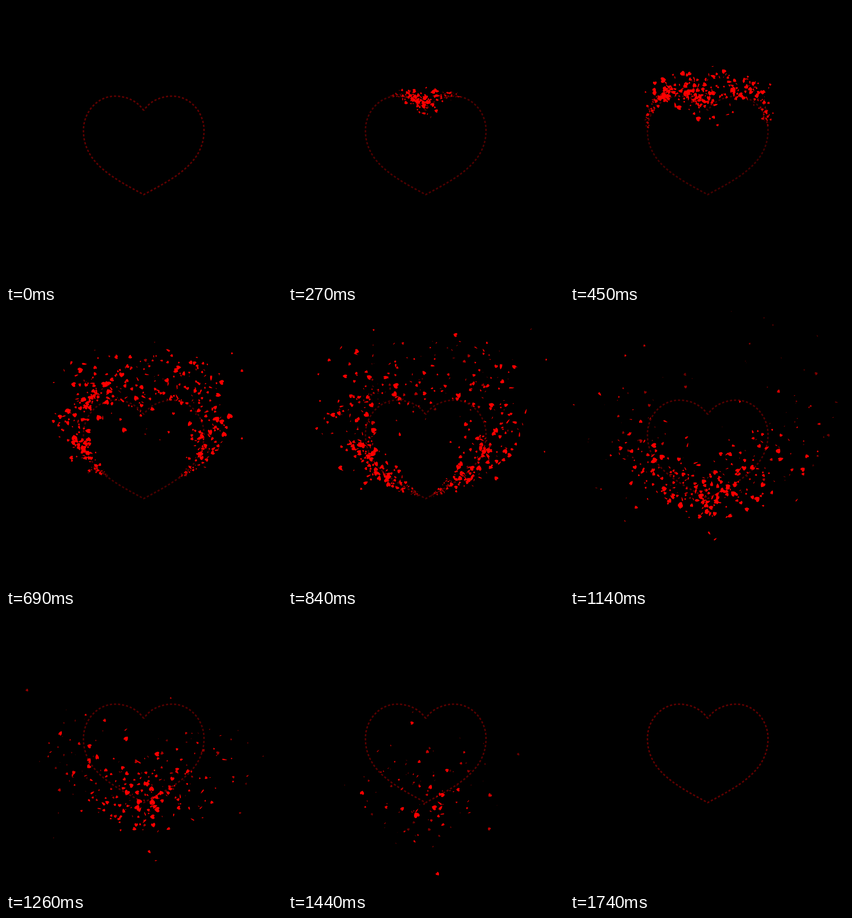
An HTML page with a canvas for the animation above (1.77 s loop, 499 px wide and 499 px high).

```html
<!DOCTYPE html>
<html lang="en">
<head>
<meta charset="utf-8">
<title>Heart burst</title>
<style>
  html, body { margin: 0; width: 100%; height: 100%; overflow: hidden; background: #000; }
  svg, canvas { position: absolute; left: 0; top: 0; width: 499px; height: 499px; }
  path { fill: none; stroke: #600000; stroke-width: 2.7; stroke-dasharray: 4 3.3; }
</style>
</head>
<body>
<svg viewBox="0 0 499 499">
  <path id="outline" d="M249 189C238 172 218 163 197 163C165 163 140 192 140 225C140 285 197 313 249 341C301 313 358 285 358 225C358 192 333 163 301 163C280 163 260 172 249 189"/>
</svg>
<canvas id="stage" width="499" height="499"></canvas>
<script>
const LOOP = 1770, STEP = 30;
const START = 95, END = 870, MAX_LIFE = 870;
const MID = 249;
const outline = document.getElementById('outline');
const ctx = document.getElementById('stage').getContext('2d');
const half = outline.getTotalLength() / 2;

let seed = 20731;
function rand() {
  seed = (seed + 0x6D2B79F5) | 0;
  let n = Math.imul(seed ^ (seed >>> 15), 1 | seed);
  n = (n + Math.imul(n ^ (n >>> 7), 61 | n)) ^ n;
  return ((n ^ (n >>> 14)) >>> 0) / 4294967296;
}
const between = (a, b) => a + (b - a) * rand();
const gauss = () => (rand() + rand() + rand() + rand() - 2) * 1.73;
const clamp = (v, a, b) => Math.max(a, Math.min(b, v));

// Where the left or right emitter stands at a given time
function emitter(time, side) {
  const p = outline.getPointAtLength(half * clamp((time - START) / (END - START), 0, 1));
  return { x: side < 0 ? p.x : 2 * MID - p.x, y: p.y };
}

function petal(born, side, drift, spread, life) {
  const p = emitter(born, side);
  const lift = clamp((300 - p.y) / 100, 0, 1);
  const [dx, dy] = drift || [
    (p.x - MID) / 109 * 0.055 * lift,
    -0.08 * clamp((235 - p.y) / 65, 0, 1)
  ];
  const wild = rand() < 0.1 ? 1.6 : 1;
  return {
    born, life,
    x: p.x + gauss() * 1.8,
    y: p.y + gauss() * 1.8,
    vx: dx + gauss() * spread * wild,
    vy: dy + gauss() * spread * wild,
    size: 3.2 + 7.3 * Math.pow(rand(), 1.6),
    angle: between(0, 6.28),
    turn: between(-0.006, 0.006),
    tilt: between(0, 6.28),
    flip: between(0.003, 0.012)
  };
}

const petals = [];
for (const side of [-1, 1]) {
  for (let i = 0; i < 315; i++) {
    const born = START + (END - START) * (i + rand()) / 315;
    petals.push(petal(born, side, null, 0.06, MAX_LIFE - 370 * Math.pow(rand(), 1.2)));
  }
}
// Two tight clumps on the left lobe
for (let i = 0; i < 28; i++) {
  petals.push(petal(between(130, 170), -1, [-0.013, -0.027], 0.025, between(400, 530)));
  petals.push(petal(between(290, 320), -1, [-0.026, -0.036], 0.016, between(440, 620)));
}

const heart = new Path2D('M0 -.25C-.12 -.55 -.55 -.5 -.52 -.12C-.5 .18 -.2 .35 0 .52C.2 .35 .5 .18 .52 -.12C.55 -.5 .12 -.55 0 -.25Z');

function drawPetal(p, t) {
  const age = t - p.born;
  if (age < 0 || age >= p.life) return;
  const left = clamp((p.life - age) / 220, 0, 1);
  const size = p.size * Math.min(1, 0.3 + age / 270) * (0.45 + 0.55 * left);
  const face = Math.cos(p.tilt + p.flip * age);
  ctx.save();
  ctx.translate(p.x + p.vx * age, p.y + p.vy * age);
  ctx.rotate(p.angle + p.turn * age);
  ctx.scale(size * Math.max(0.22, Math.abs(face)), size);
  ctx.globalAlpha = Math.min(1, 0.55 + age / 150) * Math.min(1, 0.25 + left * 1.3);
  ctx.fill(heart);
  ctx.restore();
}

function draw(t) {
  ctx.clearRect(0, 0, 499, 499);
  ctx.fillStyle = '#ff0000';
  for (const p of petals) drawPetal(p, t);
  const dim = t < 450 ? t / 450 : clamp((1740 - t) / 1290, 0, 1);
  outline.style.opacity = 1 - 0.28 * dim;
}

const begin = performance.now();
function tick() {
  const t = (performance.now() - begin) % LOOP;
  draw(Math.floor(t / STEP) * STEP);
  requestAnimationFrame(tick);
}
tick();
</script>
</body>
</html>
```
